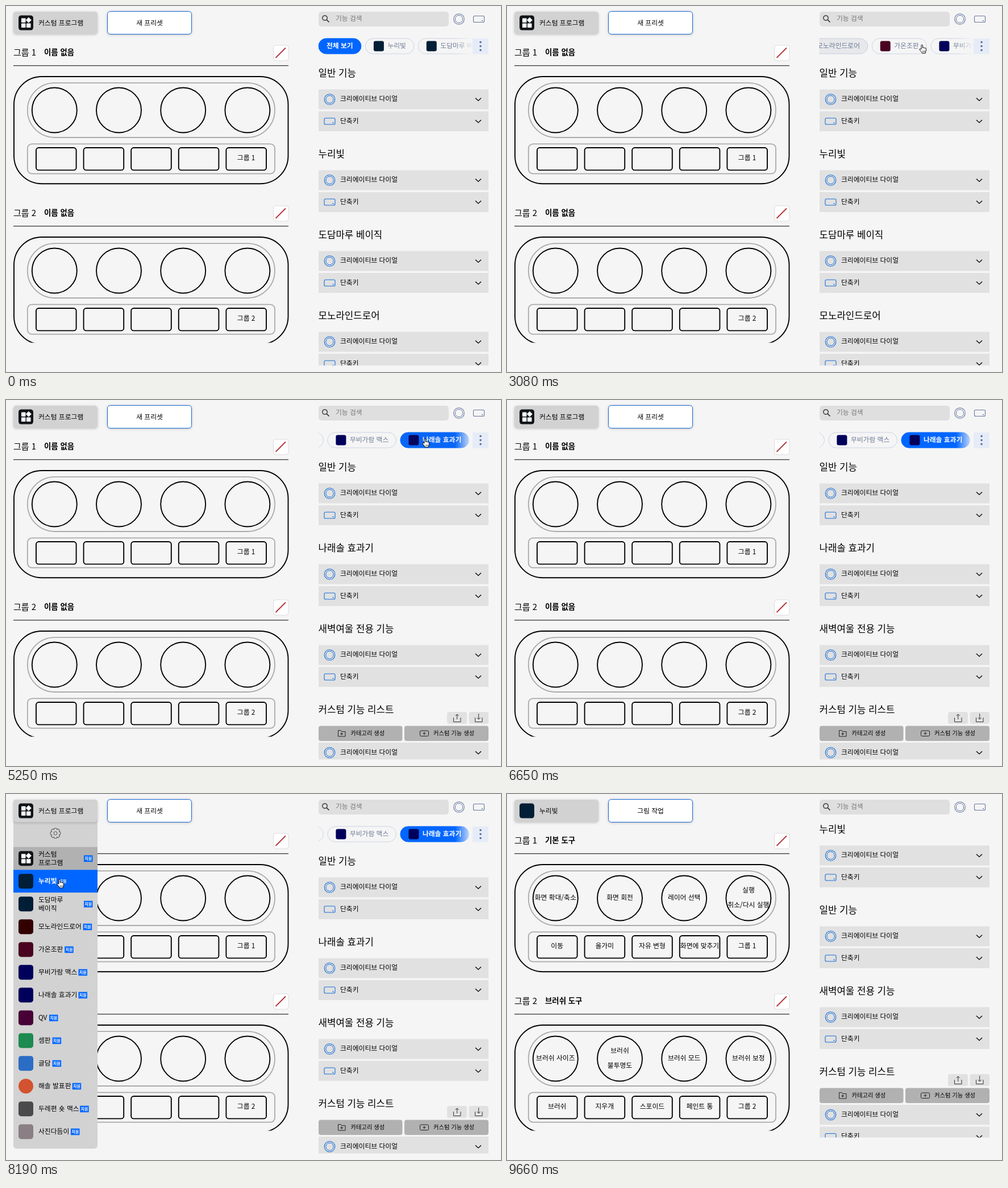
Animation of 871x643 px, one loop 9940 ms. Source, as an HTML page:

```html
<!DOCTYPE html>
<html lang="ko">
<head>
<meta charset="utf-8">
<style>
html, body { margin: 0; width: 100%; height: 100%; overflow: hidden; background: #f5f5f5; }
svg { display: block; font-family: "Noto Sans CJK KR", "Noto Sans CJK", "Noto Sans", sans-serif; }
.shadow { filter: drop-shadow(0 1px 2px #0003); }
</style>
</head>
<body>
<svg id="stage" width="871" height="643" viewBox="0 0 871 643"></svg>
<script>
const LOOP = 9940, STEP = 70;
const SELECT = 4760, OPEN = 7770, LOAD = 8680;
const BLUE = '#0066ff', BG = '#f5f5f5', GREY = '#e1e1e1', SIZE = 11.8;

const apps = [
  ['커스텀 프로그램', '#111518'],
  ['누리빛', '#001e36'],
  ['도담마루 베이직', '#001e36'],
  ['모노라인드로어', '#330000'],
  ['가온조판', '#49021f'],
  ['무비가람 맥스', '#00005b'],
  ['나래솔 효과기', '#00005b'],
  ['QV', '#470137'],
  ['셈판', '#1d8a50'],
  ['글담', '#2b6cc4'],
  ['해솔 발표판', '#d35230'],
  ['두레편 숏 맥스', '#4a4a4c'],
  ['사진다듬이', '#8a7f84']
];
const names = apps.map(a => a[0]);

// Cursor moves: start, duration, x, y and, for drags, the pressed pill
const moves = [
  [0, 210, 738, 66], [210, 140, 662, 195], [490, 490, 726, 75], [1190, 280, 778, 75], [1540, 70, 747, 75],
  [1610, 280, 553, 74, 2], [1890, 420, 744, 74], [2450, 350, 580, 79, 3], [2800, 280, 725, 67], [3080, 280, 733, 68],
  [3500, 420, 553, 68, 4], [3920, 560, 732, 67], [SELECT, 140, 732, 67, 6], [5460, 210, 721, 78],
  [5740, 210, 386, 493], [6090, 210, 463, 418], [6300, 350, 37, 650],
  [6930, 280, 778, 60], [7280, 420, 100, 32], [7840, 350, 89, 149], [8190, 140, 86, 164],
  [LOAD, 490, 584, 603], [9240, 210, 545, 650]
];

const clamp = v => Math.max(0, Math.min(1, v));
const smooth = u => u * u * (3 - 2 * u);
const easeOut = u => 1 - (1 - u) ** 2;

function pointer(t) {
  let x = 462, y = 740, scroll = 0, press = null;
  for (const [start, time, tx, ty, pill] of moves) {
    if (t < start) break;
    if (pill) press = { pill, down: start, up: start + time, x: x + 4 + scroll };
    const u = smooth(clamp((t - start) / time)), dx = (tx - x) * u;
    x += dx;
    y += (ty - y) * u;
    if (pill) scroll -= dx;
  }
  return { x, y, scroll, press };
}

const textWidth = s => [...s].reduce((w, c) => w + (c == ' ' ? 2.7 : c < '~' ? 8 : 10.8), 0);

const pills = [];
for (let i = 0, x = 550; i < 7; i++) {
  const label = i ? names[i] : '전체 보기', w = textWidth(label) + (i ? 53 : 29);
  pills.push({ label, x, w });
  x += w + 7.5;
}

const rect = (x, y, w, h, r, fill, more = '') =>
  `<rect x="${x}" y="${y}" width="${w}" height="${h}" rx="${r}" fill="${fill}" ${more}/>`;
const box = (x, y, w, h, r, stroke, sw = 2, fill = 'none') =>
  rect(x, y, w, h, r, fill, `stroke="${stroke}" stroke-width="${sw}"`);
const ring = (x, y, r, stroke, sw = 1) =>
  `<circle cx="${x}" cy="${y}" r="${r}" fill="none" stroke="${stroke}" stroke-width="${sw}"/>`;
const disc = (x, y, r, fill, opacity = 1) =>
  `<circle cx="${x}" cy="${y}" r="${r}" fill="${fill}" opacity="${opacity}"/>`;
const line = (d, stroke = '#000', sw = 1) =>
  `<path d="${d}" fill="none" stroke="${stroke}" stroke-width="${sw}"/>`;
// y is the optical middle of the line
const text = (s, x, y, size = SIZE, weight = 500, fill = '#000', anchor = 'start') =>
  `<text x="${x}" y="${y + size * .37}" font-size="${size}" font-weight="${weight}" fill="${fill}" text-anchor="${anchor}">${s}</text>`;
const mid = (s, x, y, weight) => text(s, x, y, SIZE, weight, '#000', 'middle');
const clip = (id, x, y, w, h, r, body) =>
  `<clipPath id="${id}">${rect(x, y, w, h, r, '#000')}</clipPath><g clip-path="url(#${id})">${body}</g>`;

const dialIcon = (x, y, c) => ring(x, y, 9.3, c, 1.1) + ring(x, y, 6.7, c, 1);
const keyIcon = (x, y, c) => box(x - 9.5, y - 5.5, 19, 11, 2, c, 1.1) + rect(x + 5, y + 2, 2, 1.5, 0, c);

function appIcon(i, x, y, s) {
  const fill = apps[i][1];
  if (i == 10) return disc(x + s / 2, y + s / 2, s / 2, fill);
  let out = rect(x, y, s, s, s * .18, fill);
  if (!i) {
    for (const [dx, dy] of [[5, 5], [5, 14], [14, 14]]) out += rect(x + dx, y + dy, 7.5, 7.5, .8, '#fff');
    out += `<path d="M${x + 17.8} ${y + 3.3}l5 5-5 5-5-5z" fill="#fff"/>`;
  }
  return out;
}

function device(n, name, dials, keys) {
  let out = text('그룹 ' + n, 13, 81, 15, 400) + text(name, 67, 81, 13.4, 700)
    + box(470.5, 69, 26.5, 27, 4, '#dcdcdc', 1, '#fff') + line('M474.5 91L492 73.5', '#b3333a', 1.8)
    + line('M13 104.8H497') + box(14, 124, 482.5, 188.3, 49, '#000', 1.9)
    + box(37.8, 135.2, 435.2, 95.8, 47.9, '#aaa', 1.8) + box(37.8, 242.3, 435.2, 52.4, 8, '#aaa', 1.8);
  for (let i = 0; i < 4; i++) {
    const x = 85.3 + 113.2 * i, rows = (dials[i] || '').split('|');
    out += ring(x, 183, 39.5, '#000', 1.9);
    rows.forEach((s, k) => out += mid(s, x, rows.length > 1 ? 169 + 26 * k : 182, 400));
  }
  for (let i = 0; i < 5; i++) {
    const x = 53 + 83.6 * i;
    out += box(x, 249, 70.6, 39.4, 4.5, '#000', 1.9) + mid(i < 4 ? keys[i] || '' : '그룹 ' + n, x + 35.2, 267, 400);
  }
  return `<g transform="translate(0 ${(n - 1) * 282})">${out}</g>`;
}

function leftSide(loaded) {
  const one = loaded ? ['기본 도구', ['화면 확대/축소', '화면 회전', '레이어 선택', '실행|취소/다시 실행'],
    ['이동', '올가미', '자유 변형', '화면에 맞추기']] : ['이름 없음', [], []];
  const two = loaded ? ['브러쉬 도구', ['브러쉬 사이즈', '브러쉬|불투명도', '브러쉬 모드', '브러쉬 보정'],
    ['브러쉬', '지우개', '스포이드', '페인트 통']] : one;
  return clip('leftClip', 0, 0, 520, 591.5, 0, device(1, ...one) + device(2, ...two))
    + rect(178.5, 9.5, 148, 40, 5, '#fff', 'stroke="#1268d8" class="shadow"')
    + mid(loaded ? '그림 작업' : '새 프리셋', 252.5, 29.5);
}

const listRow = (y, dial) => rect(550, y, 299, 35, 0, GREY)
  + (dial ? dialIcon : keyIcon)(569.5, y + 17.5, '#1a6fd8')
  + text(dial ? '크리에이티브 다이얼' : '단축키', 588, y + 16.5)
  + line(`M826 ${y + 15.3}l5 4.6 5-4.6`, '#000', 1.4);

// Import, export and create buttons under the last heading
const customTools = y => rect(776, y + 4, 35, 21, 4, GREY) + rect(814.5, y + 4, 34.5, 21, 4, GREY)
  + line(`M787.5 ${y + 14}v7.5h12.5v-7.5M793.7 ${y + 17}v-9m-3 3l3-3 3 3`, '#333')
  + line(`M825.5 ${y + 14}v7.5h12.5v-7.5M831.7 ${y + 7}v10m-3-3l3 3 3-3`, '#333')
  + rect(550, y + 28.5, 147.5, 26.5, 4, '#b1b1b1') + rect(701, y + 28.5, 148, 26.5, 4, '#b1b1b1')
  + line(`M584.5 ${y + 47}v-10.5h4.5l1.5 2h6.5v8.5zM590.7 ${y + 40}v5m-2.5-2.5h5`, '#222')
  + box(728.5, y + 37, 15, 9.5, 2, '#222', 1) + line(`M736 ${y + 39.3}v5m-2.5-2.5h5`, '#222')
  + text('카테고리 생성', 606.5, y + 41, 10.3) + text('커스텀 기능 생성', 752, y + 41, 10.3);

function section(name, y) {
  const custom = name.startsWith('커스텀'), top = y + (custom ? 58 : 28.5);
  return text(name, 549.5, y, 16.8) + (custom ? customTools(y) : '')
    + listRow(top, true) + listRow(top + 38.5, false);
}

function pill(i, t, { scroll, press }) {
  const { label, w, x: home } = pills[i], x = home - scroll;
  const on = i == (t < SELECT ? 0 : 6);
  let ripple = '';
  if (press && press.pill == i) {
    const u = easeOut(clamp((t - press.down) / 300)), cx = press.x + (home + w / 2 - press.x) * u - scroll;
    const fade = 1 - clamp((t - press.up) / 500);
    ripple = clip('ripple', x, 57, w, 27, 13.5, disc(cx, 70.5, u * w * .55, '#66718c', .22 * fade));
  }
  return box(x, 57, w, 27, 13.5, on ? BLUE : '#cdd3e2', 1, on ? BLUE : BG)
    + (i ? appIcon(i, x + 14.5, 61.5, 18) : '')
    + text(label, x + (i ? 39 : 14), 70, SIZE, on ? 700 : 400, on ? '#fff' : '#6f7b98') + ripple;
}

function rightSide(t, loaded, at) {
  const rest = ['새벽여울 전용 기능', '커스텀 기능 리스트'];
  const list = loaded ? [names[1], '일반 기능', ...rest]
    : t < SELECT ? ['일반 기능', ...names.slice(1, 4)] : ['일반 기능', names[6], ...rest];
  const first = loaded ? 62 : 118;
  let out = rect(550, 10, 229, 26, 5, '#dfdfdf') + ring(561, 21, 4.2, '#222', 1.3) + line('M564 24l4.5 4.5', '#222', 1.5)
    + text('기능 검색', 580, 22, SIZE, 400, '#777')
    + dialIcon(797, 23, '#67779f') + keyIcon(832, 23, '#67779f')
    + clip('listClip', 540, 45, 331, (loaded ? 603.5 : 631.5) - 45, 0,
      list.map((s, i) => section(s, first + 142 * i)).join(''));
  if (!loaded) {
    out += clip('tabClip', 549.5, 56, 272, 30, 0,
      pills.map((_, i) => pill(i, t, at)).join('') + rect(790, 56, 32, 30, 0, 'url(#fade)'))
      + rect(821, 57, 28, 27.5, 0, '#e6ecf7');
    for (let y = 63.5; y < 80; y += 7) out += disc(835, y, 1.8, '#56709f');
  }
  return out;
}

function menu(t, at) {
  let out = rect(13, 10, 148, 613, 5, '#d2d2d2') + ring(87, 69, 3, '#555');
  for (let i = 0; i < 8; i++)
    out += `<g transform="rotate(${45 * i} 87 69)">${line('M84 63l1-2.8h4l1 2.8', '#555')}</g>`;
  const hover = at.x < 161 ? Math.floor((at.y - 94) / 40) : -1;
  names.forEach((name, i) => {
    const y = 113.2 + 40 * i, on = i && i == hover;
    const rows = textWidth(name) > 77 ? name.split(' ') : [name];
    const badge = rows.length > 1 ? 137 : 60 + textWidth(name);
    if (on || !i) out += rect(13, y - 20, 148, 40, 0, on ? BLUE : '#b1b1b1');
    out += appIcon(i, 22, y - 13, 26);
    rows.forEach((s, k) =>
      out += text(s, 57, y - .5 + (k * 2 - rows.length + 1) * 7.5, SIZE, on ? 700 : 500, on ? '#fff' : '#000'));
    out += rect(badge, y - 5.5, 15.5, 11.5, 0, BLUE) + text('지원', badge + 7.7, y + .2, 6.8, 700, '#fff', 'middle');
  });
  return clip('menuClip', 13, 10, 148, 40 + 573 * easeOut(clamp((t - OPEN) / 210)), 5, out);
}

function cursor({ x, y }) {
  const hand = x > 545 || x < 161 && y < 520;
  const shape = hand
    ? '<path d="M4 9V2.3a1.2 1.2 0 0 1 2.4 0V6.6a1.1 1.1 0 0 1 2.1.2 1.1 1.1 0 0 1 2 .6 1 1 0 0 1 1.9.8V11c0 2-1 2.5-1.2 5H5.6C5 14 2 11.6 1 9.7c-.6-1.3 1-2 1.8-1z"/><path d="M6.6 11.5v2.8m1.9-2.8v2.8m1.9-2.8v2.8" stroke-width=".7"/>'
    : '<path d="M1 1v13l3.2-3 2 4.8 2-.8-2-4.7h4.3z"/>';
  return `<g transform="translate(${x} ${y})" fill="#fff" stroke="#000" stroke-linejoin="round">${shape}</g>`;
}

function scene(t) {
  const loaded = t >= LOAD, at = pointer(t), app = loaded ? 1 : 0;
  return `<linearGradient id="fade"><stop stop-color="${BG}" stop-opacity="0"/><stop offset="1" stop-color="${BG}"/></linearGradient>`
    + rect(0, 0, 871, 643, 0, BG) + leftSide(loaded) + rightSide(t, loaded, at)
    + (t >= OPEN && !loaded ? menu(t, at) : '')
    + rect(13, 10, 148, 39.5, 5, '#d2d2d2', 'class="shadow"') + appIcon(app, 22, 16.5, 26) + text(names[app], 57, 29.5)
    + cursor(at);
}

const stage = document.getElementById('stage');
let start, shown = 0;
function tick(now) {
  start ??= now;
  const t = Math.floor((now - start) % LOOP / STEP) * STEP;
  if (t != shown) stage.innerHTML = scene(shown = t);
  requestAnimationFrame(tick);
}
stage.innerHTML = scene(0);
requestAnimationFrame(tick);
</script>
</body>
</html>
```
